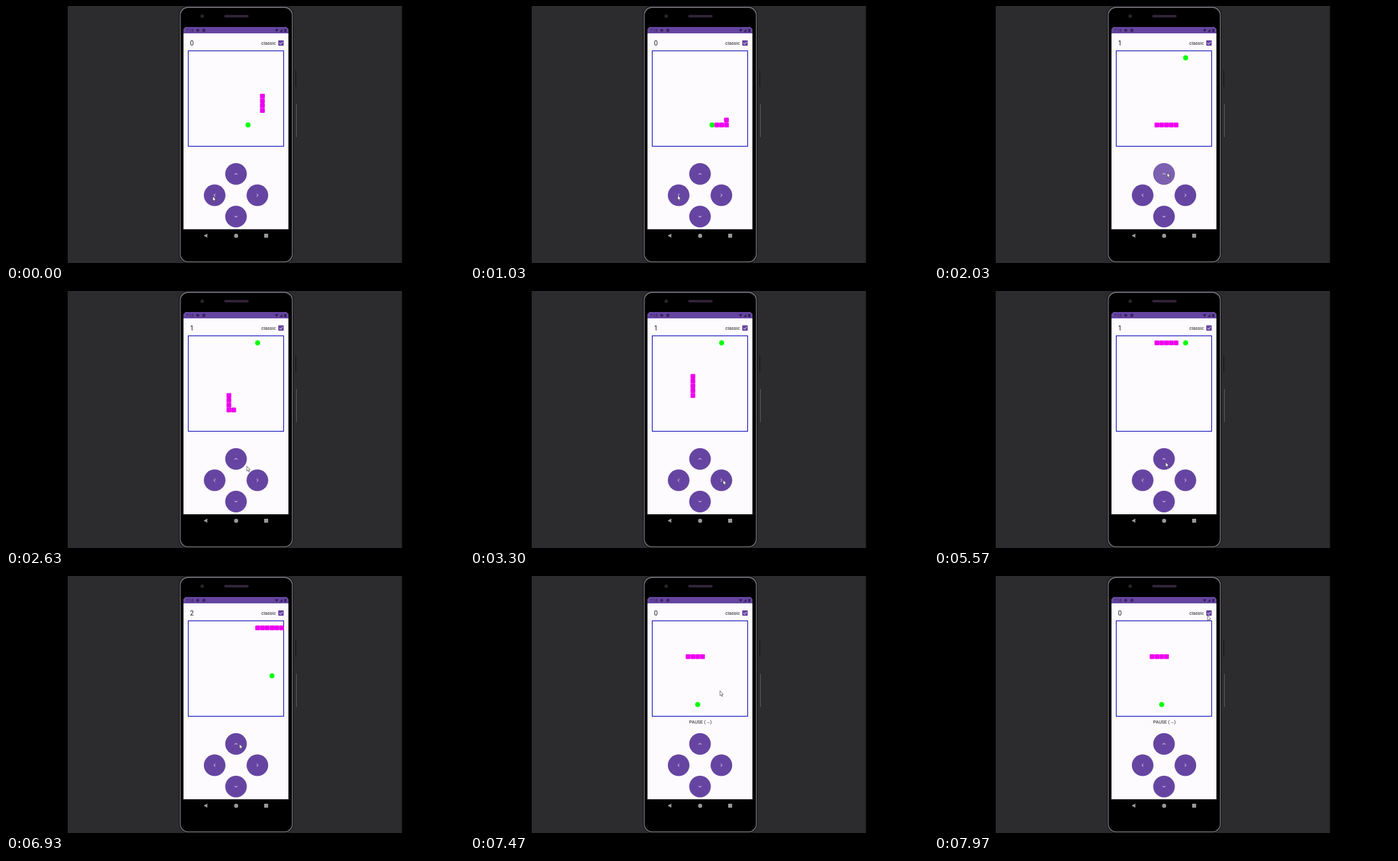
An HTML page with a canvas for the animation above (8 s loop, 720 by 404 pixels).

```html
<!DOCTYPE html>
<html lang="en">
<head>
<meta charset="utf-8">
<title>Snake on a phone</title>
<style>
html, body { margin: 0; width: 100%; height: 100%; overflow: hidden; background: #000; }
canvas { display: block; }
</style>
</head>
<body>
<canvas id="stage" width="720" height="404"></canvas>
<script>
const ctx = document.getElementById("stage").getContext("2d");
const LOOP = 8000, FIRST_TICK = 30, TICK = 202.8, CRASH = 36;
const CELL = 7.53, LEFT = 286.4, TOP = 70.2;
const PURPLE = "#6645a2", PAPER = "#fefbfe", INK = "#1c1b1f";

// Button centres with the turn of their chevrons
const buttons = {
  up: [361.6, 264, 0], right: [395.2, 297.5, 1],
  down: [361.6, 331, 2], left: [328, 297.5, 3]
};
const presses = [[490, "left"], [1860, "up"], [4600, "right"]];

// Pointer stops: time, x, y
const stops = [
  [0, 325, 299], [950, 325, 299], [1650, 366.5, 262], [2250, 366.5, 262],
  [3150, 398, 297], [3420, 398, 297], [4450, 396, 294], [4950, 396, 294],
  [5570, 364, 269], [5900, 367, 264], [7130, 367, 264], [7900, 430, 62], [8000, 430, 62]
];

function fillBox(x, y, w, h, r, color) {
  ctx.fillStyle = color;
  ctx.beginPath();
  ctx.roundRect(x, y, w, h, r);
  ctx.fill();
}

function disc(x, y, r, color) {
  ctx.fillStyle = color;
  ctx.beginPath();
  ctx.arc(x, y, r, 0, Math.PI * 2);
  ctx.fill();
}

function shape(points, color) {
  ctx.fillStyle = color;
  ctx.beginPath();
  points.forEach(([x, y]) => ctx.lineTo(x, y));
  ctx.closePath();
  ctx.fill();
}

function line(points, color, width) {
  ctx.strokeStyle = color;
  ctx.lineWidth = width;
  ctx.beginPath();
  points.forEach(([x, y]) => ctx.lineTo(x, y));
  ctx.stroke();
}

function text(str, x, y, size, color = INK) {
  ctx.fillStyle = color;
  ctx.font = `${size}px Roboto, sans-serif`;
  ctx.fillText(str, x, y);
}

function drawPhone() {
  fillBox(0, 0, 720, 404, 0, "#000");
  fillBox(97, 0, 525.5, 404, 0, "#2c2c2f");

  fillBox(455, 101, 1.2, 26, 0, "#171519");
  fillBox(456, 154, 1, 52, 0, "#605a64");
  // Dark rim, light bevel, black face
  fillBox(272, 0, 180, 404, 14, "#0b0a0c");
  fillBox(273, 1, 178, 402, 13, "#6e6a70");
  fillBox(274.6, 3, 174.8, 398.4, 12, "#000");
  disc(308.5, 16, 2.8, "#27242a");
  fillBox(343, 14, 38.5, 4, 2, "#302438");

  fillBox(279, 33, 165, 318, [6, 6, 0, 0], PAPER);
  fillBox(279, 33, 165, 10, [6, 6, 0, 0], PURPLE);
  const dim = "#30204f";
  text("7:16", 283, 40.8, 6.3, dim);
  disc(301.5, 38.3, 2.3, dim);
  disc(301.5, 38.3, 0.8, PURPLE);
  disc(311, 38.3, 2.5, dim);
  line([[309.5, 38.3], [312.5, 38.3]], PURPLE, 0.8);
  shape([[422.5, 36.5], [428.5, 36.5], [425.5, 40.8]], dim);
  shape([[434.5, 36], [434.5, 40.8], [430, 40.8]], dim);
  fillBox(437.5, 36, 3.2, 5, 0.5, dim);

  const nav = "#9a989b";
  shape([[310.5, 361], [316.5, 357.7], [316.5, 364.3]], nav);
  disc(361.8, 361.2, 3.2, nav);
  fillBox(405.8, 358, 6.3, 6.3, 0.5, nav);
}

function headAt(n) {
  if (n <= 3) return [15, 12 + n];
  if (n <= 10) return [18 - n, 15];
  if (n <= 24) return [8, 25 - n];
  return [n - 16, 1];
}

function drawGame(n) {
  const over = n >= CRASH;
  const score = over ? 0 : n >= 30 ? 2 : n >= 6 ? 1 : 0;
  const food = over ? [9, 17] : [[12, 15], [14, 1], [17, 11]][score];

  text(score, 289.2, 62.3, 10.5);
  text("classic", 401.3, 61.2, 7.4);
  fillBox(428, 54, 8.6, 8.6, 1, PURPLE);
  line([[429.8, 58.4], [431.6, 60.2], [435, 56.6]], "#fff", 1);

  ctx.strokeStyle = "#0808b4";
  ctx.lineWidth = 1.1;
  ctx.strokeRect(286.5, 70.5, 150, 150);

  disc(LEFT + (food[0] + 0.5) * CELL, TOP + (food[1] + 0.5) * CELL, 3.9, "#0f0");
  for (let i = 0; i < 4 + score; i++) {
    const [col, row] = over ? [10 - i, 7] : headAt(n - i);
    fillBox(LEFT + col * CELL, TOP + row * CELL, CELL, CELL, 1.3, "#ee00f0");
  }
  if (over) text("PAUSE (→)", 344.5, 231.7, 7.2);
}

function drawButtons(t) {
  for (const name in buttons) {
    const [x, y, turn] = buttons[name];
    disc(x, y, 17, PURPLE);
    for (const [start, target] of presses) {
      const age = t - start;
      if (target !== name || age < 0 || age > 550) continue;
      const alpha = 0.15 * Math.min(1, (550 - age) / 250);
      disc(x, y, 6 + 11 * Math.min(1, age / 180), `rgba(255,255,255,${alpha})`);
    }
    ctx.save();
    ctx.translate(x, y);
    ctx.rotate(turn * Math.PI / 2);
    line([[-2.2, 1.1], [0, -1.1], [2.2, 1.1]], "#f4effa", 1);
    ctx.restore();
  }
}

function drawPointer(t) {
  const i = stops.findIndex(s => s[0] > t);
  const [t0, x0, y0] = stops[i - 1], [t1, x1, y1] = stops[i];
  const p = (t - t0) / (t1 - t0), e = p * p * (3 - 2 * p);
  ctx.save();
  ctx.translate(x0 + (x1 - x0) * e, y0 + (y1 - y0) * e);
  const arrow = [[0, 0], [0, 7.6], [1.7, 6.1], [2.8, 8.8], [4, 8.3], [2.9, 5.7], [5.2, 5.5], [0, 0]];
  shape(arrow, "#fff");
  line(arrow, "#242128", 0.6);
  ctx.restore();
}

function frame(now) {
  const t = now % LOOP;
  const steps = Math.max(0, Math.floor((t - FIRST_TICK) / TICK) + 1);
  drawPhone();
  drawGame(steps);
  drawButtons(t);
  drawPointer(t);
}

let start;
function loop(now) {
  start ??= now;
  frame(now - start);
  requestAnimationFrame(loop);
}
frame(0);
requestAnimationFrame(loop);
</script>
</body>
</html>
```
